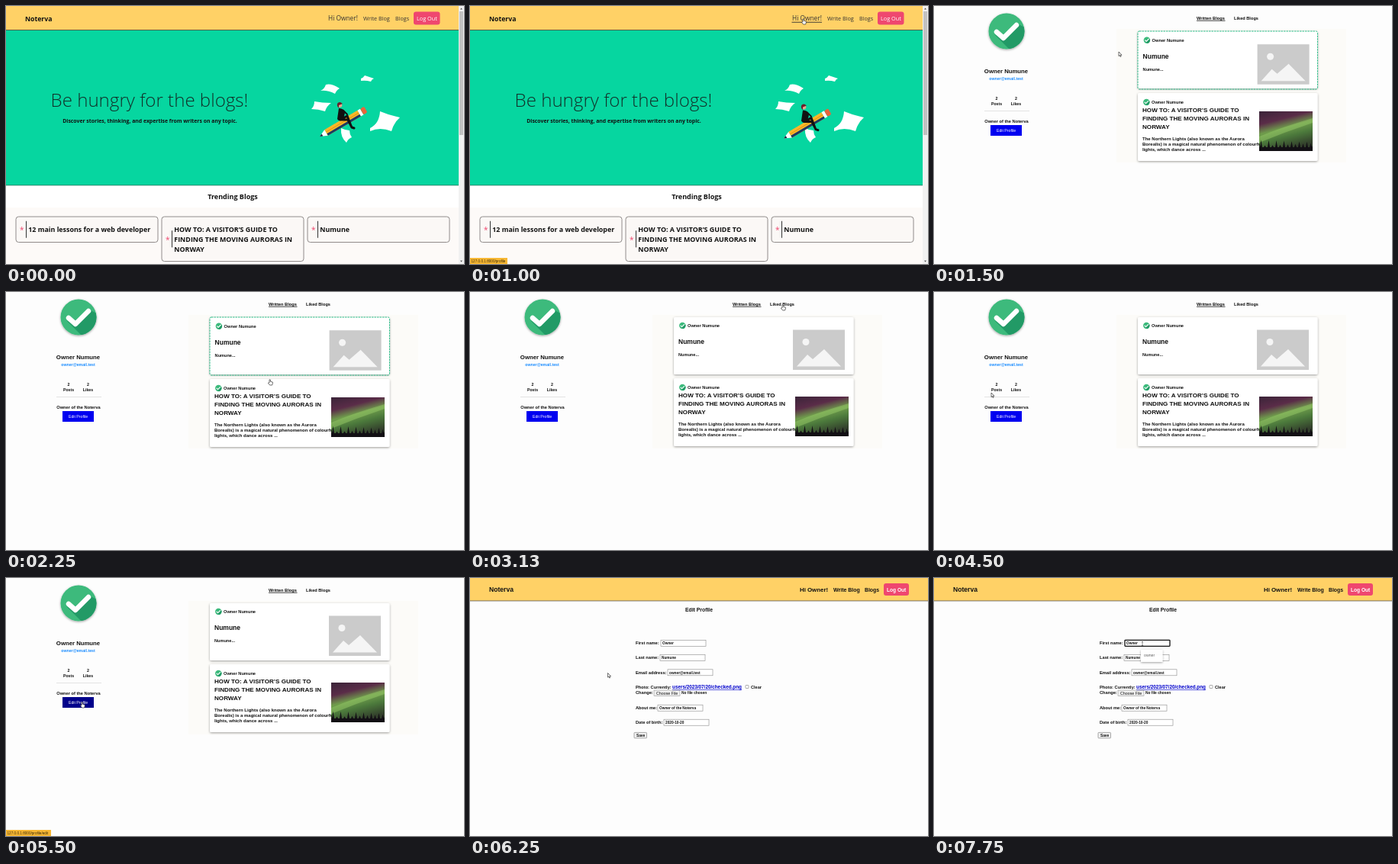
Animation, 600 px wide and 338 px high, one loop 8 s. Source, as an HTML page:

```html
<!DOCTYPE html>
<html lang="en">
<head>
<meta charset="utf-8">
<style>
html, body { margin: 0; height: 100%; overflow: hidden; background: #fdfdfd; }
svg { display: block; width: 100vw; height: 100vh; }
text { white-space: pre; }
.sans { font-family: "Open Sans", "Noto Sans", sans-serif; }
.grot { font-family: "Liberation Sans", Arial, sans-serif; font-weight: 700; }
.reg { font-weight: 400; }
.bold { font-weight: 700; }
.mid { text-anchor: middle; }
</style>
</head>
<body>
<svg id="stage" viewBox="0 0 600 338"></svg>
<script>
const SITE = 'Noterva', NAME = 'Owner', LAST = 'Numune', MAIL = 'owner@email.test';
const GUIDE = ['HOW TO: A VISITOR’S GUIDE TO', 'FINDING THE MOVING AURORAS IN', 'NORWAY'];

const text = (x, y, size, str, cls = '', fill = '#111') =>
  `<text x="${x}" y="${y}" font-size="${size}" class="${cls}" fill="${fill}">${str}</text>`;
const lines = (x, y, step, size, list, cls) =>
  list.map((s, i) => text(x, y + i * step, size, s, cls)).join('');
const rect = (x, y, w, h, fill, more = '') =>
  `<rect x="${x}" y="${y}" width="${w}" height="${h}" fill="${fill}" ${more}/>`;
const circle = (x, y, r, fill, more = '') =>
  `<circle cx="${x}" cy="${y}" r="${r}" fill="${fill}" ${more}/>`;
const path = (d, fill, more = '') => `<path d="${d}" fill="${fill}" ${more}/>`;
const group = (id, body, more = '') => `<g id="${id}" ${more}>${body}</g>`;

const defs = `<defs>
  <linearGradient id="sky" x1="0" y1="0" x2=".35" y2="1">
    <stop offset="0" stop-color="#3a2438"/><stop offset=".3" stop-color="#5a2c48"/>
    <stop offset=".52" stop-color="#6f9c4c"/><stop offset=".72" stop-color="#4c7a3c"/>
    <stop offset="1" stop-color="#33402c"/>
  </linearGradient>
  <filter id="soft" x="-20%" y="-20%" width="140%" height="150%">
    <feDropShadow dx="0" dy="1" stdDeviation="1.6" flood-color="#000" flood-opacity=".38"/>
  </filter>
  <clipPath id="disc"><circle cx="0" cy="0" r="23.5"/></clipPath>
</defs>`;

function badge(x, y, scale, more = '') {
  return `<g transform="translate(${x} ${y}) scale(${scale})" ${more}>` +
    circle(0, 0, 23.5, '#3cba7c') +
    path('M-16 4L10 30H40V4L16-9L-4 10Z', '#229a66', 'clip-path="url(#disc)"') +
    path('M-13 1L-4 9L13-8', 'none',
      'stroke="#fff" stroke-width="6.5" stroke-linecap="round" stroke-linejoin="round"') + '</g>';
}

// ---- Home ----
function homeCard(x, h, title) {
  const cy = 276 + h / 2;
  return rect(x, 276, 186, h, '#fbf8f6', 'rx="3.5" stroke="#85817f" stroke-width=".9"') +
    text(x + 5, cy + 4.5, 10, '*', '', '#ef476f') +
    rect(x + 13, cy - 11, 1, 22, '#333') + lines(x + 16.3, 296.3, 12.6, 8.9, title, 'bold');
}

function rider() {
  const pencil = `<g transform="translate(411 171) rotate(-30.5)">` +
    path('M0 0L10-4.5V4.5Z', '#fff') + path('M0 0L4-1.8V1.8Z', '#15233c') +
    rect(10, -4.5, 50, 9, '#fbb829') + rect(10, 1.5, 50, 3, '#1c3a63') +
    rect(10, -1.3, 50, .9, '#e09315') +
    rect(60, -4.5, 4, 9, '#fff') + rect(64, -4.5, 6, 9, '#e8663c', 'rx="2"') + '</g>';
  const limb = 'stroke="#111" stroke-width="3" stroke-linecap="round" stroke-linejoin="round"';
  return pencil +
    path('M436 134Q443 134 444 140L442 149Q436 152 434 148Z', '#111') +
    path('M438 149L448 149L453 159L456 160M440 148L447 144L452 157', 'none', limb) +
    path('M442 137L447 142', 'none', 'stroke="#111" stroke-width="2" stroke-linecap="round"') +
    circle(437.5, 130, 2.8, '#e9a68b') + path('M434 131Q433 126 438 126L441 128L436 130V134Z', '#6b1f2c');
}

const papers = [
  'M412 111Q417 109 419 103Q426 101 437 108Q433 110 431 115Q421 110 412 111Z',
  'M465 95Q468 94 470 91Q476 93 482 95Q479 96 478 99Q471 97 465 98Z',
  'M400 135Q404 131 404 125Q414 127 426 127Q420 131 418 138Q409 135 400 135Z',
  'M477 160Q489 154 490 138Q502 143 516 146Q508 153 505 164Q490 158 477 164Z',
  'M439 160Q445 163 450 163Q450 168 453 172Q448 174 446 179Q438 172 439 160Z'
];

const home = group('home',
  rect(0, 0, 600, 338, '#fdfaf8') + rect(0, 0, 593, 32, '#ffd166') + rect(0, 31, 593, 1, '#5b6048') +
  rect(0, 32, 593, 203, '#06d6a0') + rect(0, 234.5, 593, 1, '#24735c') + rect(0, 235.5, 593, 28.5, '#fff') +
  text(25, 19.5, 8.7, SITE, 'bold') +
  text(422, 19.2, 8.37, `Hi ${NAME}!`, '', '#333') + group('hiLine', rect(421.5, 20.8, 39.5, .9, '#333')) +
  text(468, 19.2, 7.25, 'Write Blog', '', '#333') + text(510, 19.2, 7.15, 'Blogs', '', '#333') +
  rect(534, 7.5, 34.5, 17, '#ef476f', 'rx="3"') + text(538, 19.2, 7.3, 'Log Out', '', '#fff') +
  text(188, 131.8, 24.1, 'Be hungry for the blogs!', 'mid', '#12312a" font-weight="300') +
  text(188.5, 153, 6.88, 'Discover stories, thinking, and expertise from writers on any topic.', 'bold mid') +
  papers.map(d => path(d, '#fff')).join('') + group('rider', rider()) +
  text(297, 252.8, 9, 'Trending Blogs', 'bold mid') +
  homeCard(13, 33.5, ['12 main lessons for a web developer']) +
  homeCard(204, 58.5, GUIDE) + homeCard(395, 33.5, [LAST]) +
  rect(593, 0, 7, 338, '#f1f1f1') + rect(594, 7, 5, 162, '#c1c1c1') +
  path('M595 4.5L596.5 2.5L598 4.5ZM595 333.5L596.5 335.5L598 333.5Z', '#505050'),
  'class="sans"');

// ---- Profile ----
const cardBox = (y, h) => rect(267, y, 235.5, h, '#fff', 'rx="2" filter="url(#soft)"');
const edge = (id, y, h) => group(id,
  rect(267, y, 235.5, h, 'none', 'rx="2" stroke="#2fbf8a" stroke-dasharray="2.5 1"'));
const author = y => badge(278.3, y, .18) + text(285, y + 2, 5.7, `${NAME} ${LAST}`);

let trees = 'M426 189V180';
for (let x = 426; x < 496; x += 5) {
  const top = 178 + 4 * Math.sin(x * 1.9);
  trees += `L${x + 1} 184L${x + 2.5} ${top}L${x + 4} 184`;
}
trees += 'L496 182V189Z';

const profile = group('profile',
  rect(0, 0, 600, 338, '#fdfdfd') + rect(239, 30, 301, 175, '#fcfbf8') +
  badge(95, 33, 1, 'filter="url(#soft)"') +
  text(94.5, 88, 7.75, `${NAME} ${LAST}`, 'mid') + text(94.5, 97, 5.2, MAIL, 'mid', '#1a8cff') +
  text(82, 123, 5.3, '2', 'mid') + text(107.5, 123, 5.3, '2', 'mid') +
  text(82, 129.5, 5.2, 'Posts', 'mid') + text(107.5, 129.5, 5.2, 'Likes', 'mid') +
  rect(66, 137, 59, .7, '#d8d8d8') + text(95, 153, 5.7, `${NAME} of the ${SITE}`, 'mid') +
  `<rect id="editBtn" x="74" y="156" width="41" height="14"/>` +
  text(94.5, 165, 5.2, 'Edit Profile', 'mid reg', '#fff') +
  text(344, 17.6, 5.7, 'Written Blogs') + rect(344, 18.8, 37.5, .8, '#111') + text(393, 17.6, 5.65, 'Liked Blogs') +
  group('card1', cardBox(33, 75) + edge('edge1', 33, 76) + `<g class="in">` + author(44) +
    text(273, 68.3, 8.5, LAST) + text(273, 84, 5.6, LAST + '...') +
    rect(423, 49.5, 68, 52.5, '#cbcbcb') + circle(440, 65.5, 4.5, '#f5f5f5') +
    path('M428 97.5L442 82L449 88L464 75L486 97.5Z', '#f5f5f5') + '</g>') +
  group('card2', cardBox(113, 89) + edge('edge2', 113, 89) + author(125) +
    lines(273, 138.3, 10.6, 8.1, GUIDE) +
    lines(273, 175, 6.8, 6, ['The Northern Lights (also known as the Aurora',
      'Borealis) is a magical natural phenomenon of colourful', 'lights, which dance across ...']) +
    rect(426, 137, 70, 52, 'url(#sky)') +
    path('M426 170Q455 158 496 146V152Q460 164 426 178Z', '#9bd06a', 'opacity=".45"') + path(trees, '#120f14')),
  'class="grot"');

// ---- Edit form ----
const label = (y, s) => text(217, y, 5.7, s);
const field = (x, y, value) =>
  rect(x, y, 59, 8, '#fff', 'stroke="#8a8a8a" stroke-width=".6"') + text(x + 2, y + 5.8, 4.75, value);

const edit = group('edit',
  rect(0, 0, 600, 338, '#fdfdfd') + rect(0, 0, 600, 30, '#ffd166') + rect(0, 29.5, 600, .9, '#6d675a') +
  text(25, 18, 8.6, SITE) + text(432, 18, 7.85, `Hi ${NAME}!`) +
  text(476, 18, 7, 'Write Blog') + text(517, 18, 6.85, 'Blogs') +
  rect(542, 7, 33, 16, '#ef476f', 'rx="3"') + text(546, 18, 6.6, 'Log Out', '', '#fff') +
  text(300, 44.4, 6.85, 'Edit Profile', 'mid') +
  label(87, 'First name:') + field(250, 81.4, NAME) +
  group('focus', rect(250, 81.4, 59, 8, 'none', 'rx=".8" stroke="#111" stroke-width="1.2"')) +
  label(106, 'Last name:') + field(249, 100.3, LAST) +
  label(125.6, 'Email address:') + field(259, 119.8, MAIL) +
  label(145, 'Photo: Currently:') +
  text(265, 145, 6.35, 'users/2023/07/20/checked.png', '', '#00c" text-decoration="underline') +
  rect(361, 140.5, 4, 4, '#fff', 'rx=".6" stroke="#777" stroke-width=".6"') + text(368, 145, 5.6, 'Clear') +
  label(152, 'Change:') + rect(241, 147, 34, 7.5, '#efefef', 'stroke="#888" stroke-width=".5"') +
  text(244, 152.6, 5.3, 'Choose File', 'reg') + text(277, 152.4, 4.85, 'No file chosen') +
  label(172, 'About me:') + field(246, 166.2, `${NAME} of the ${SITE}`) +
  label(191, 'Date of birth:') + field(254, 185.2, '2020-10-20') +
  rect(215, 202.4, 16.5, 7.4, '#efefef', 'rx=".8" stroke="#777" stroke-width=".6"') + text(218, 208, 4.8, 'Save') +
  group('popup', rect(271, 94, 28.5, 16, '#fff', 'filter="url(#soft)" opacity=".95"') +
    text(275, 103, 5.2, 'owner', 'reg', '#666')),
  'class="grot"');

const overlay = group('status', '<rect y="330" height="8" fill="#f7b733"/>' + text(1.5, 336, 4.65, '', '', '#3a2a08'),
  'class="grot reg"') +
  group('cursor',
    path('M0 0V5.6L1.3 4.5L2.2 6.5L3.1 6.1L2.2 4.2H4Z', '#fff', 'id="arrow" stroke="#111" stroke-width=".6"') +
    path('M0 0Q.8-.8 1.4 0V2.3L4.3 3V5L3.6 7H.6L-1.6 4.2Q-1 3.2 0 4Z', '#fff', 'id="hand" stroke="#111" stroke-width=".6"') +
    path('M-1.2-2.5H1.2M0-2.5V2.5M-1.2 2.5H1.2', 'none', 'id="beam" stroke="#333" stroke-width=".6"'));

document.getElementById('stage').innerHTML = defs + home + profile + edit + overlay;
const el = id => document.getElementById(id);
const show = (id, on) => el(id).setAttribute('display', on ? 'inline' : 'none');
const shift = (node, x, y) => node.setAttribute('transform', `translate(${x} ${y})`);

// ---- Timeline ----
const STEP = 125, LOOP = 8000, TO_PROFILE = 1250, TO_EDIT = 5875, FOCUS = 7250;
const route = [
  [125, 500, 75], [750, 436, 17], [1125, 436, 17], [1500, 242, 60], [1750, 242, 62], [2125, 340, 80],
  [2375, 350, 150], [2625, 372, 90], [3000, 409, 17], [3125, 409, 17], [3750, 406, 18], [4375, 75, 132],
  [4500, 75, 132], [4875, 105, 127], [5375, 99, 163], [6000, 99, 163], [6500, 262, 86], [6750, 273, 86], [8000, 273, 86]
];

function pointer(t) {
  const i = Math.max(1, route.findIndex(k => k[0] >= t));
  const [t0, x0, y0] = route[i - 1], [t1, x1, y1] = route[i];
  const u = Math.min(1, Math.max(0, (t - t0) / (t1 - t0)));
  return [x0 + (x1 - x0) * u, y0 + (y1 - y0) * u];
}

const inside = ([x, y], l, t, r, b) => x >= l && x <= r && y >= t && y <= b;
function cardAt(t) {
  if (t < TO_PROFILE || t >= TO_EDIT) return 0;
  const p = pointer(t);
  return inside(p, 267, 33, 502, 108) ? 1 : inside(p, 267, 113, 502, 202) ? 2 : 0;
}

function draw(t) {
  const p = pointer(t);
  const page = t < TO_PROFILE ? 'home' : t < TO_EDIT ? 'profile' : 'edit';
  for (const id of ['home', 'profile', 'edit']) show(id, id === page);

  const onHi = page === 'home' && t >= 125 && inside(p, 421, 9, 461, 23);
  const onTab = page === 'profile' && inside(p, 343, 10, 426, 21);
  const onEdit = page === 'profile' && inside(p, 74, 156, 115, 170);
  const onField = page === 'edit' && inside(p, 250, 81, 309, 90);
  const card = cardAt(t), lit = cardAt(t - STEP);

  show('hiLine', onHi);
  shift(el('rider'), 0, 1.3 * (1 - Math.cos(Math.PI * t / 1000)));
  show('edge1', lit === 1);
  show('edge2', lit === 2);
  shift(document.querySelector('#card1 .in'), lit === 1 ? .6 : 0, lit === 1 ? .7 : 0);
  shift(el('card2'), 0, lit === 1 ? 1 : 0);
  el('editBtn').setAttribute('fill', onEdit ? '#00008b' : '#0000f0');
  show('focus', t >= FOCUS);
  show('popup', t >= FOCUS);

  const held = card && card === cardAt(t - 3 * STEP);
  const url = onHi ? 'profile' : onEdit ? 'profile/edit' : held ? 'blog/' + card : '';
  show('status', url);
  el('status').lastChild.textContent = '127.0.0.1:8000/' + url;
  el('status').firstChild.setAttribute('width', onEdit ? 59 : 49);

  const hand = onHi || onTab || onEdit || card > 0;
  show('cursor', t >= 125);
  show('hand', hand);
  show('beam', onField);
  show('arrow', !hand && !onField);
  shift(el('cursor'), ...p);
}

function tick(now) {
  draw(Math.floor(now % LOOP / STEP) * STEP);
  requestAnimationFrame(tick);
}
draw(0);
requestAnimationFrame(tick);
</script>
</body>
</html>
```
